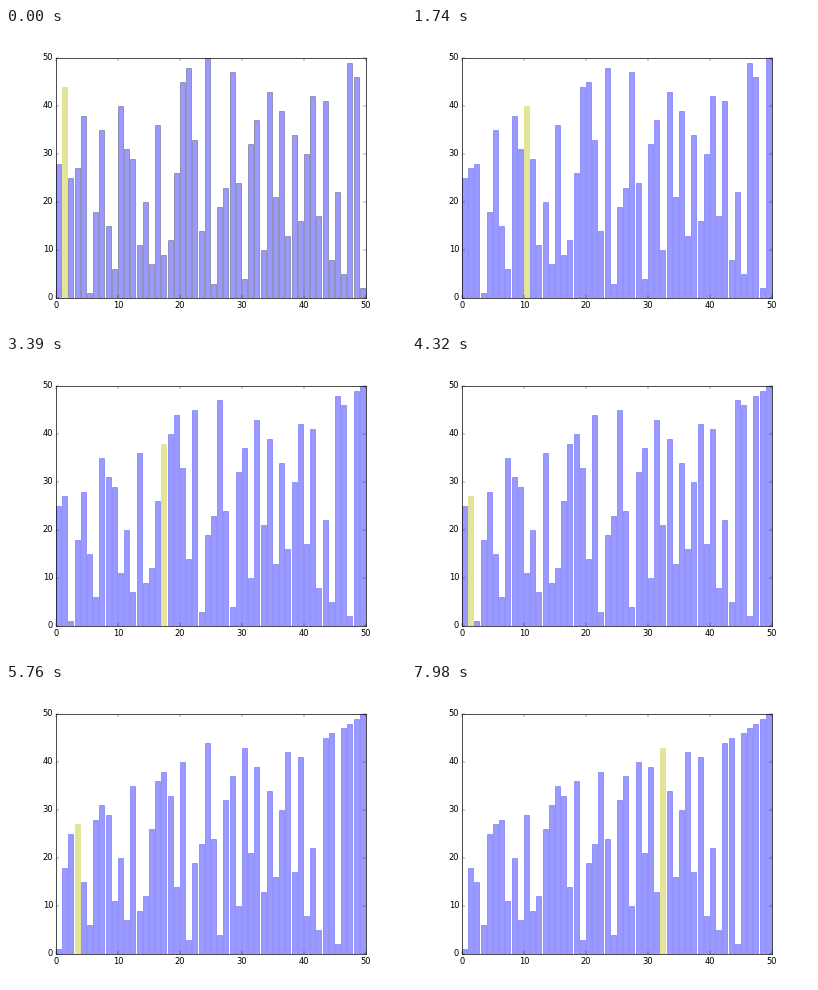
These frames come from a looping animation (400x300 px, 8000 ms). A matplotlib script:

```python
import matplotlib.pyplot as plt
from matplotlib.animation import FuncAnimation

LOOP_MS = 8000
FRAMES = 267
BLUE, YELLOW = (0, 0, 1), (0.75, 0.75, 0)

# The shuffled list to sort; everything shown later follows from it.
VALUES = [28, 44, 25, 27, 38, 1, 18, 35, 15, 6,
          40, 31, 29, 11, 20, 7, 36, 9, 12, 26,
          45, 48, 33, 14, 50, 3, 19, 23, 47, 24,
          4, 32, 37, 10, 43, 21, 39, 13, 34, 16,
          30, 42, 17, 41, 8, 22, 5, 49, 46, 2]
N = len(VALUES)


def bubble_steps(values):
    """Yield (heights, cursor, bars visited so far) after each comparison."""
    a = list(values)
    visited = 0
    for end in range(N - 1, 0, -1):
        for j in range(1, end + 1):
            if a[j - 1] > a[j]:
                a[j - 1], a[j] = a[j], a[j - 1]
            visited = max(visited, j)
            yield a[:], j, visited


steps = [s for s, _ in zip(bubble_steps(VALUES), range(FRAMES))]

plt.rcParams.update({
    "font.family": "DejaVu Sans",
    "font.size": 12,
    "axes.linewidth": 1.0,
    "axes.axisbelow": False,
    "ytick.alignment": "center",
})

fig = plt.figure(figsize=(8, 6), dpi=50, facecolor="white")
ax = fig.add_axes([0.125, 0.1, 0.775, 0.8])
bars = ax.bar(range(N), VALUES, width=0.8, align="edge", alpha=0.4,
              color=BLUE, edgecolor="black", linewidth=1.0)
ax.set(xlim=(0, N), ylim=(0, N),
       xticks=range(0, N + 1, 10), yticks=range(0, N + 1, 10))
ax.tick_params(direction="in", length=4, width=0.5, pad=4,
               top=True, right=True)


def draw(i):
    heights, cursor, visited = steps[i]
    for k, (bar, h) in enumerate(zip(bars, heights)):
        bar.set_height(h)
        fill = YELLOW if k == cursor else BLUE
        bar.set_facecolor(fill)
        # bars keep a black outline until the cursor reaches them
        bar.set_edgecolor(fill if k <= visited else "black")
    return list(bars)


def reset():
    return draw(0)


anim = FuncAnimation(fig, draw, frames=FRAMES, init_func=reset,
                     interval=LOOP_MS / FRAMES, repeat=True, repeat_delay=0,
                     blit=False, cache_frame_data=False)
plt.show()
```
